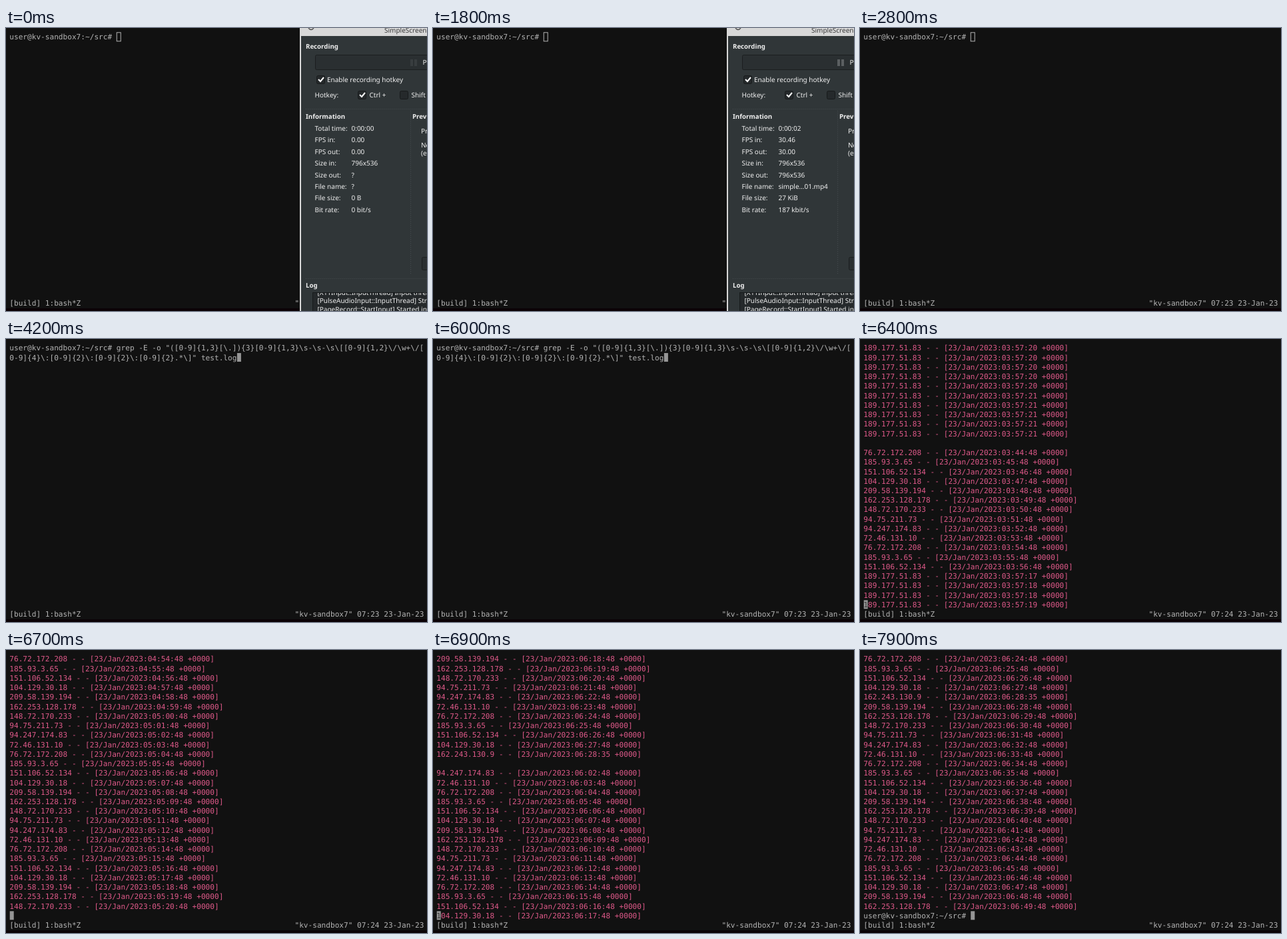
An HTML page for the animation above (8 s loop, 632 by 424 pixels).

```html
<!DOCTYPE html>
<html lang="en">
<head>
<meta charset="utf-8">
<title>Terminal log search</title>
<style>
  html, body { margin: 0; width: 100%; height: 100%; overflow: hidden; background: #111; }
  svg { display: block; width: 632px; height: 424px; }
  text { white-space: pre; text-rendering: geometricPrecision; }
  #terminal { font: 11.11px "DejaVu Sans Mono", monospace; fill: #b3b3b3; }
  #terminal .match { fill: #de5989; }
  #recorder { font: 10px "Noto Sans", sans-serif; fill: #f0f0f0; }
  .heading { font-size: 9.7px; font-weight: bold; }
  .button { fill: #2a2f31; stroke: #1b1e1f; }
  .box { fill: #25292b; stroke: #171a1b; }
  .tick { fill: none; stroke: #fff; stroke-width: 2; }
  .dots { stroke: #474d50; stroke-dasharray: 1 2; }
</style>
</head>
<body>
<svg viewBox="0 0 632 424">
  <rect width="632" height="424" fill="#111"/>
  <rect y="420" width="632" height="4" fill="#0b0206"/>
  <g id="terminal"></g>

  <g id="recorder">
    <rect x="441" width="191" height="424" fill="#d8d8d8"/>
    <rect x="443" y="12" width="189" height="412" fill="#303638"/>
    <path d="M454 0Q458 5 462 0" fill="none" stroke="#555" stroke-width="1.5"/>
    <text x="568" y="7" fill="#3a3a3a">SimpleScreenRecorder</text>

    <text class="heading" x="450" y="31">Recording</text>
    <rect class="button" x="464.5" y="40.5" width="180" height="22" rx="2"/>
    <path id="pause" d="M607 47h4v10h-4zM613 47h4v10h-4z" fill="#5b5f61"/>
    <text x="625.5" y="55">Pause recording</text>
    <rect class="box" x="466.5" y="71.5" width="12" height="12" rx="2"/>
    <path class="tick" d="M469 77l3 3 5-6"/>
    <text x="482" y="81">Enable recording hotkey</text>
    <text x="463.5" y="104">Hotkey:</text>
    <rect class="box" x="528.5" y="94.5" width="12" height="12" rx="2"/>
    <path class="tick" d="M531 100l3 3 5-6"/>
    <text x="545.5" y="104">Ctrl +</text>
    <rect class="box" x="591.5" y="94.5" width="12" height="12" rx="2"/>
    <text x="608.5" y="104">Shift +</text>

    <path class="dots" d="M450 121.5H632M607.5 124V370M450 375.5H632"/>
    <text class="heading" x="450" y="136">Information</text>
    <text class="heading" x="610" y="136">Preview</text>
    <g id="info"></g>
    <text x="623" y="158">Preview frame rate</text>
    <text x="623" y="179">Note: preview</text>
    <text x="623" y="191">(especially</text>
    <rect class="button" x="624.5" y="343.5" width="30" height="19" rx="2"/>

    <text class="heading" x="450" y="389">Log</text>
    <rect class="box" x="460.5" y="396.5" width="200" height="40"/>
    <clipPath id="logView"><rect x="461" y="397" width="171" height="27"/></clipPath>
    <g clip-path="url(#logView)">
      <text x="467.5" y="400">[X11Input::InputThread] Input thread started.</text>
      <text x="467.5" y="412">[PulseAudioInput::InputThread] Stream is ready.</text>
      <text x="467.5" y="425">[PageRecord::StartInput] Started input.</text>
    </g>
  </g>
</svg>

<script>
const LOOP = 8000, STEP = 100, ROWS = 28;
const LEFT = 5.3, TOP = 17.4, CELL = 6.69, LINE = 14.24;
const PROMPT = 'user@kv-sandbox7:~/src# ';
const COMMAND = [
  String.raw`${PROMPT}grep -E -o "([0-9]{1,3}[\.]){3}[0-9]{1,3}\s-\s-\s\[[0-9]{1,2}\/\w+\/[`,
  String.raw`0-9]{4}\:[0-9]{2}\:[0-9]{2}\:[0-9]{2}.*\]" test.log`
];
const HOSTS = ['148.72.170.233', '94.75.211.73', '94.247.174.83', '72.46.131.10', '76.72.172.208',
  '185.93.3.65', '151.106.52.134', '104.129.30.18', '209.58.139.194', '162.253.128.178'];

const byId = id => document.getElementById(id);
function add(parent, tag, attrs) {
  const el = document.createElementNS('http://www.w3.org/2000/svg', tag);
  for (const key in attrs) el.setAttribute(key, attrs[key]);
  return parent.appendChild(el);
}

// One request per minute, with a burst at 03:57 and a stray one at 06:28.
const log = [];
let burstShown, strayShown;
const two = n => String(n).padStart(2, '0');
function record(host, minute, second) {
  log.push(`${host} - - [23/Jan/2023:${two(minute / 60 | 0)}:${two(minute % 60)}:${two(second)} +0000]`);
}
for (let minute = 0; minute <= 409; minute++) {
  if (minute === 237) {
    [17, 18, 18, 19].forEach(s => record('189.177.51.83', minute, s));
    for (let i = 0; i < 27; i++) {
      record('189.177.51.83', minute, 20 + (i / 5 | 0));
      if (i === 9) burstShown = log.length;
    }
  }
  if (minute === 388) {
    record('162.243.130.9', minute, 35);
    strayShown = log.length;
  }
  record(HOSTS[minute % 10], minute, 48);
}

const terminal = byId('terminal');
const rows = Array.from({length: ROWS + 1}, (_, r) => add(terminal, 'text', {x: LEFT, y: TOP + r * LINE}));
const clock = add(terminal, 'text', {x: LEFT + 64 * CELL, y: TOP + ROWS * LINE});
const cursor = add(terminal, 'rect', {width: CELL - .7, height: 13});
const covered = add(terminal, 'text', {fill: '#333'});
rows[ROWS].textContent = '[build] 1:bash*Z';

const labels = ['Total time', 'FPS in', 'FPS out', 'Size in', 'Size out', 'File name', 'File size', 'Bit rate'];
const values = labels.map((label, i) => {
  const y = 154 + i * 17.4;
  add(byId('info'), 'text', {x: 463.5, y}).textContent = label + ':';
  return add(byId('info'), 'text', {x: 518.5, y});
});
const INFO = [
  [0, ['0:00:00', '0.00', '0.00', '796x536', '?', '?', '0 B', '0 bit/s']],
  [800, ['0:00:01', '30.00', '30.00', '796x536', '796x536', 'simple…01.mp4', '0 B', '0 bit/s']],
  [1800, ['0:00:02', '30.46', '30.00', '796x536', '796x536', 'simple…01.mp4', '27 KiB', '187 kbit/s']]
];

function placeCursor(col, row, filled) {
  const x = LEFT + col * CELL, y = TOP + row * LINE;
  cursor.setAttribute('x', x + .4);
  cursor.setAttribute('y', y - 10.6);
  cursor.setAttribute('fill', filled ? '#969696' : 'none');
  cursor.setAttribute('stroke', filled ? 'none' : '#b3b3b3');
  covered.setAttribute('x', x);
  covered.setAttribute('y', y);
  covered.textContent = filled ? rows[row].textContent[col] || '' : '';
}

function showLines(lineAt, isMatch) {
  for (let r = 0; r < ROWS; r++) {
    rows[r].textContent = lineAt(r) || '';
    rows[r].setAttribute('class', isMatch(r) ? 'match' : '');
  }
}

function showTerminal(t) {
  if (t < 6100) {
    const lines = t < 4100 ? [PROMPT] : COMMAND;
    showLines(r => lines[r], () => false);
    placeCursor(lines[lines.length - 1].length, lines.length - 1, t >= 2900);
  } else if (t < 7000) {
    // Output wraps to the top; a blank row marks the write position.
    const rate = (strayShown - burstShown) / 500;
    const count = Math.round(burstShown + (t - 6400) * rate);
    const head = ((count - burstShown + 10) % ROWS + ROWS) % ROWS;
    showLines(r => r === head ? '' : log[count - head + r - (r > head ? ROWS : 0)], () => true);
    placeCursor(0, ROWS - 1, true);
  } else {
    const last = ROWS - 1;
    showLines(r => r < last ? log[log.length - last + r] : PROMPT, r => r < last);
    placeCursor(PROMPT.length, last, true);
  }
  clock.textContent = `"kv-sandbox7" 07:${t < 6100 ? 23 : 24} 23-Jan-23`;
}

function showRecorder(t) {
  byId('recorder').style.display = t < 2800 ? '' : 'none';
  const [, texts] = INFO.filter(([start]) => t >= start).pop();
  values.forEach((el, i) => el.textContent = texts[i]);
  byId('pause').style.opacity = Math.min(1, .3 + t / 600);
}

let shown = -1;
const origin = performance.now();
function tick() {
  const t = Math.floor((performance.now() - origin) % LOOP / STEP) * STEP;
  if (t !== shown) {
    shown = t;
    showTerminal(t);
    showRecorder(t);
  }
  requestAnimationFrame(tick);
}
tick();
</script>
</body>
</html>
```
